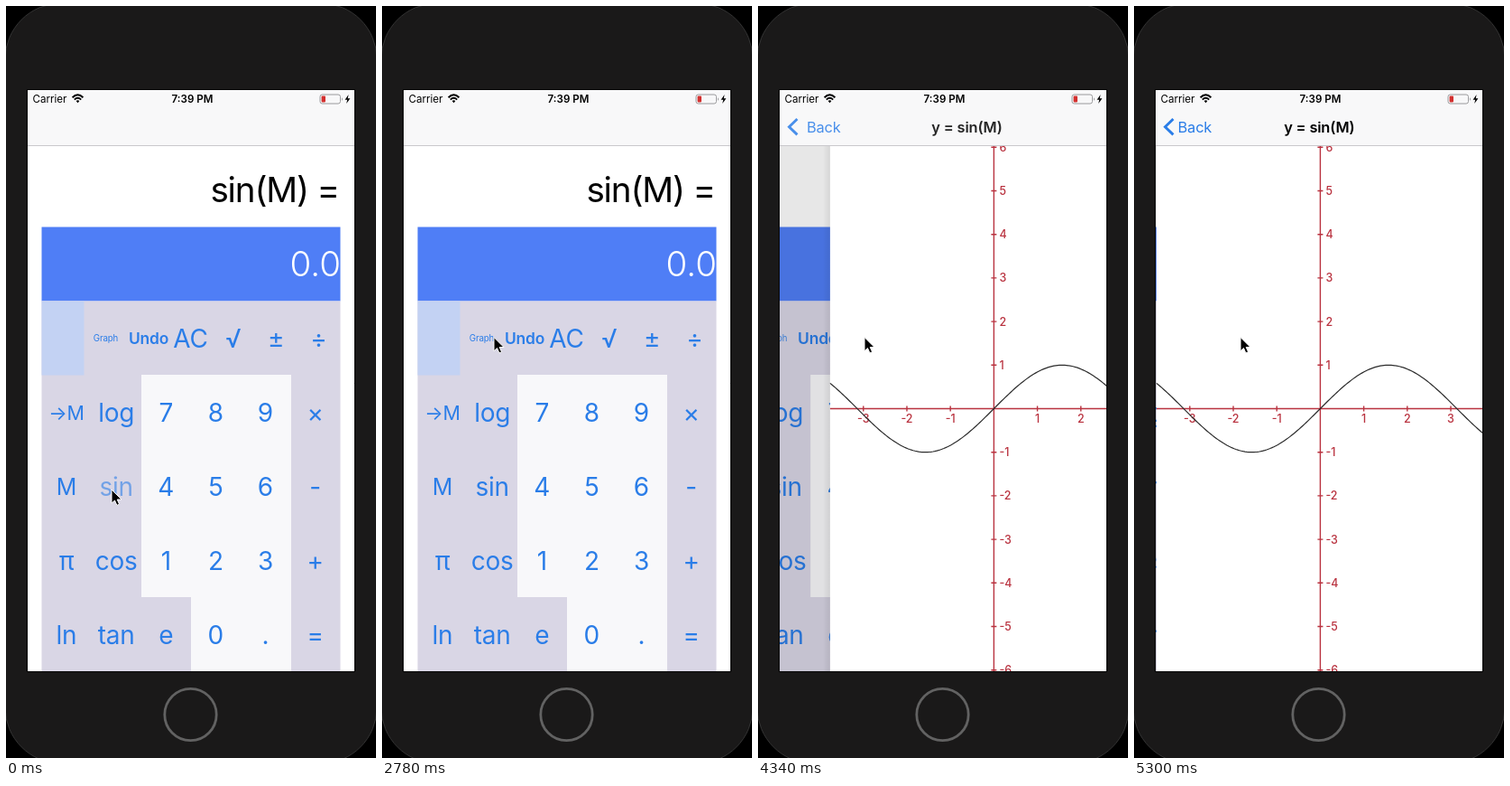
An HTML page that plays this animation: 410 by 832 pixels, repeating every 5.4 s.

```html
<!DOCTYPE html>
<html lang="en">
<head>
<meta charset="utf-8">
<title>Graphing calculator</title>
<style>
html, body { margin: 0; width: 100%; height: 100%; overflow: hidden; background: #000; }
svg { display: block; width: 410px; height: 832px; font-family: Inter, Roboto, sans-serif; }
#keys, #back { fill: #2a7de8; }
#keys text { text-anchor: middle; letter-spacing: -.01em; }
#axes { stroke: #b9323f; stroke-width: 1.4; }
#labels { fill: #b9323f; font-size: 12.5px; font-weight: 500; }
</style>
</head>
<body>
<svg viewBox="0 0 410 832">
  <defs>
    <clipPath id="screen"><rect x="24" y="93" width="362" height="643"/></clipPath>
    <linearGradient id="shade"><stop offset="0" stop-opacity="0"/><stop offset="1" stop-opacity=".2"/></linearGradient>
  </defs>
  <rect x="-1" y="-3" width="412" height="841" rx="62" fill="#1a1919" stroke="#343434"/>
  <circle cx="204.5" cy="784" r="28.7" fill="#1a1919" stroke="#626262" stroke-width="2.8"/>
  <rect x="23.5" y="92.5" width="363" height="644" fill="#fff" stroke="#060606"/>

  <g clip-path="url(#screen)">
    <g id="calc">
      <rect x="24" y="154" width="362" height="582" fill="#fff"/>
      <text x="369" y="217" text-anchor="end" font-size="38.6" letter-spacing="-.03em">sin(M) =</text>
      <rect x="39.5" y="244.5" width="331" height="82" fill="#4f7ef6"/>
      <text x="371" y="299" text-anchor="end" font-size="38.6" font-weight="300" fill="#fff">0.0</text>
      <rect x="39.5" y="326.5" width="331" height="410" fill="#d9d6e5"/>
      <rect x="39.5" y="326.5" width="47" height="82" fill="#c3d2f3"/>
      <path d="M150 408H316V736H205V654H150Z" fill="#f8f8fa"/>
      <g id="keys"></g>
    </g>
    <rect id="dim" x="24" y="154" width="362" height="582"/>
    <g id="graph">
      <rect id="edge" x="-8" y="154" width="8" height="582" fill="url(#shade)"/>
      <rect y="154" width="362" height="582" fill="#fff"/>
      <path id="axes" fill="none"/>
      <g id="labels"></g>
      <path id="curve" fill="none" stroke="#2c2c2c" stroke-width="1.2"/>
    </g>

    <rect x="24" y="93" width="362" height="61.5" fill="#f8f8f9"/>
    <path d="M24 154.5H386" stroke="#c9c8cc"/>
    <g id="back">
      <path d="M43.5 125L34.5 133.7L43.5 142.4" fill="none" stroke="#2a7de8" stroke-width="2.9"/>
      <text id="backText" y="139.5" font-size="16.4" letter-spacing="-.01em">Back</text>
    </g>
    <text id="title" y="139.5" text-anchor="middle" font-size="16.4" font-weight="600" letter-spacing="-.01em">y = sin(M)</text>

    <g font-size="11.6">
      <text x="29.5" y="107">Carrier</text>
      <text x="206.5" y="107" text-anchor="middle" font-weight="600">7:39 PM</text>
    </g>
    <g fill="none" stroke="#000" stroke-width="2">
      <path d="M73.6 101.2Q79.5 95.4 85.4 101.2M75.8 103.6Q79.5 100 83.2 103.6"/>
      <path d="M77.6 105L79.5 107.2L81.4 105Q79.5 103.4 77.6 105Z" fill="#000" stroke="none"/>
    </g>
    <rect x="348" y="98" width="22.5" height="10" rx="2.4" fill="none" stroke="#99999c"/>
    <rect x="349.6" y="99.6" width="4.4" height="6.8" rx=".8" fill="#d3302f"/>
    <path d="M372 101.2Q374 103 372 104.8Z" fill="#99999c"/>
    <path d="M379.6 98L375.6 103.8H378.2L377.2 108L381.4 102.2H378.7Z"/>
  </g>

  <path id="cursor" d="M0 0V15.2L3.5 12L5.9 17.4L8.6 16.2L6.2 11H11Z" stroke="#fff" stroke-width="1"/>
</svg>
<script>
const LOOP = 5400, PUSH = 3880, UNIT = 48.2, OX = 181.5, OY = 445.5;
const $ = id => document.getElementById(id);
const set = (id, attrs) => { for (const k in attrs) $(id).setAttribute(k, attrs[k]); };
const clamp = v => Math.min(1, Math.max(0, v));
const range = (a, b) => Array.from({ length: b - a + 1 }, (_, i) => a + i);

const key = (s, x, y, size = 28, weight = 400) =>
  `<text id="key-${s}" x="${x}" y="${y + size * .36}" font-size="${size}" font-weight="${weight}">${s}</text>`;

const sizes = { "→M": 21.5, M: 25 };
const rows = ["→M log 7 8 9 ×", "M sin 4 5 6 -", "π cos 1 2 3 +", "ln tan e 0 . ="];
$("keys").innerHTML = key("Graph", 110.5, 367.5, 9.7) + key("Undo", 158, 367.5, 17.4, 600) +
  [..."√±÷"].map((s, i) => key(s, 252 + i * 47.2, 368)).join("") + key("AC", 204.5, 368) +
  rows.map((row, r) => row.split(" ").map((s, c) =>
    key(s, 67 + c * 55.1, 450 + r * 82, sizes[s])).join("")).join("");

let axes = `M0 ${OY}H362M${OX} 154V736`, labels = "";
for (const n of range(-6, 6).filter(Boolean)) {
  const y = OY - n * UNIT, x = OX + n * UNIT;
  axes += `M${OX - 3} ${y}h6`;
  labels += `<text x="${OX + 6}" y="${y + 4.5}">${n}</text>`;
  if (Math.abs(n) < 4) {
    axes += `M${x} ${OY - 3}v6`;
    labels += `<text x="${x}" y="461" text-anchor="middle">${n}</text>`;
  }
}
set("axes", { d: axes });
$("labels").innerHTML = labels;
set("curve", { d: "M" + range(0, 181).map(i =>
  `${i * 2} ${(OY - UNIT * Math.sin((i * 2 - OX) / UNIT)).toFixed(2)}`).join("L") });

// Pointer stops: time, x, y
const stops = [[0, 117, 535], [350, 117, 535], [1600, 122, 363], [1940, 122, 363],
  [2500, 124, 366.5], [2900, 124, 366.5], [3400, 118, 366.5], [LOOP, 118, 366.5]];

function pointer(t) {
  const i = stops.findIndex(s => s[0] > t);
  const a = stops[i - 1], b = stops[i], p = (t - a[0]) / (b[0] - a[0]);
  const e = p * p * (3 - 2 * p);
  return [1, 2].map(k => a[k] + (b[k] - a[k]) * e);
}

function draw(t) {
  // Damped spring: rest runs from 1 (off screen) to 0 (settled)
  const s = Math.max(0, t - PUSH) / 1000, u = s * (7.94 - 1.53 * s);
  const rest = (1 + u) * Math.exp(-u);
  const lag = rest * (.58 + 1.6 * rest - 1.2 * rest * rest);

  set("calc", { transform: `translate(${-108.6 * (1 - rest)})` });
  set("graph", { transform: `translate(${24 + 362 * rest})` });
  set("dim", { opacity: .11 * (1 - rest) });
  set("edge", { opacity: s ? Math.sqrt(rest) : 0 });
  set("back", { opacity: 1 - rest });
  set("backText", { x: 48.5 + 44 * lag });
  set("title", { x: 205 + 215 * lag, opacity: 1 - rest });
  set("key-sin", { opacity: .58 + .42 * clamp(t / 350) });
  set("key-Graph", { opacity: t < 3600 ? 1 : .2 + .8 * clamp((t - 3850) / 600) });
  set("cursor", { transform: `translate(${pointer(t)})` });
}

const start = performance.now();
function tick() {
  draw((performance.now() - start) % LOOP);
  requestAnimationFrame(tick);
}
tick();
</script>
</body>
</html>
```
